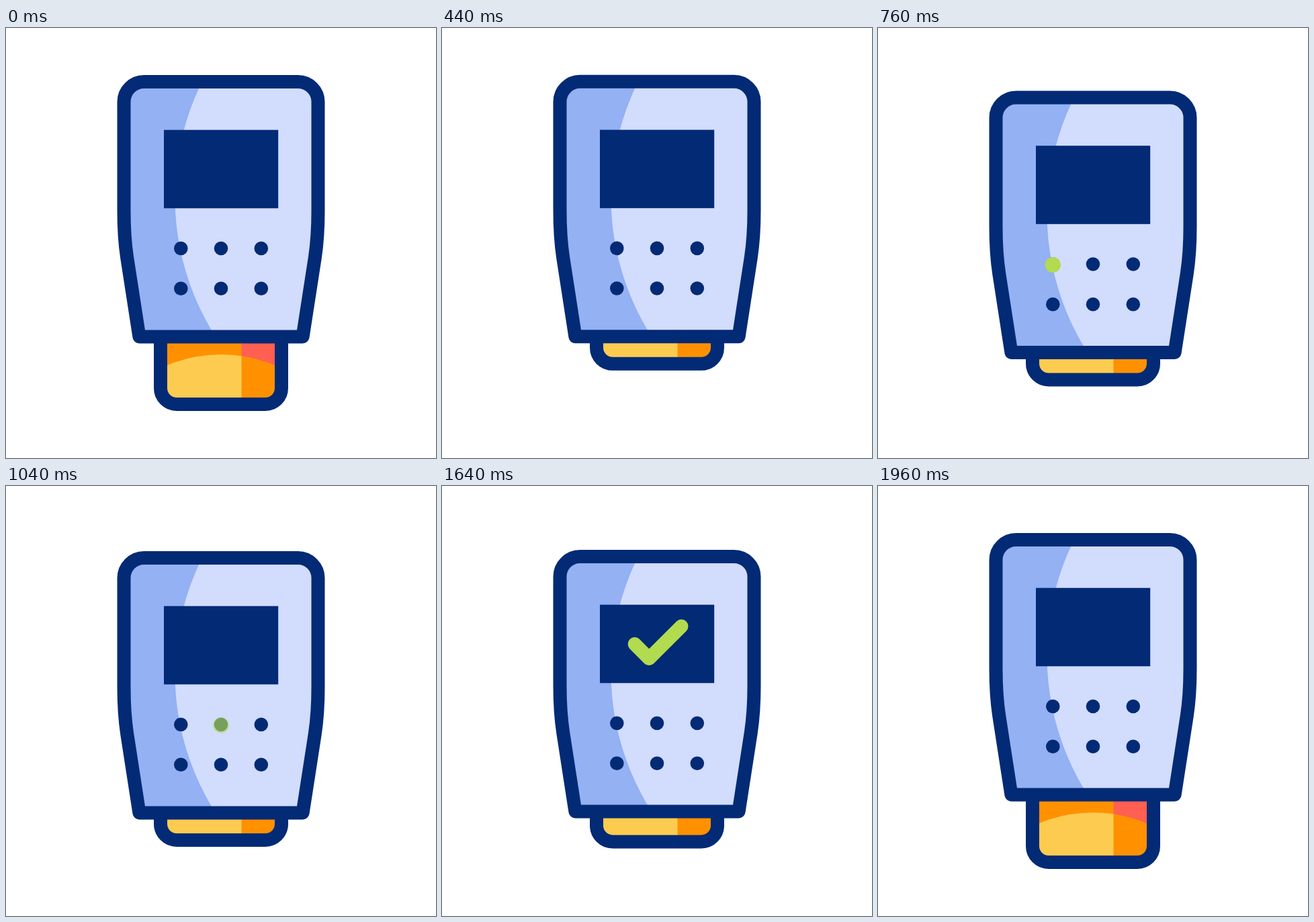
An HTML page for the animation above (2000 ms loop, 640 px wide and 640 px high).

```html
<!DOCTYPE html>
<html lang="en">
<head>
<meta charset="utf-8">
<title>Card reader</title>
<style>
  html, body { margin: 0; width: 100%; height: 100%; overflow: hidden; background: #fff; }
  svg { display: block; width: 100vw; height: 100vh; }
  .line { fill: none; stroke: #032a75; stroke-width: 20; stroke-linejoin: round; }
  .navy { fill: #032a75; }
  .lit { fill: #b2db50; }
</style>
</head>
<body>
<svg viewBox="0 0 640 640">
  <defs>
    <path id="case" d="M198.4 459.5L180.2 342Q175.5 311 175.5 272V110A30 30 0 0 1 205.5 80H434.5A30 30 0 0 1 464.5 110V272Q464.5 311 459.8 342L441.6 459.5Z"/>
    <path id="slip" d="M230 430V536A24 24 0 0 0 254 560H386A24 24 0 0 0 410 536V430Z"/>
    <clipPath id="caseClip"><use href="#case"/></clipPath>
    <clipPath id="slipClip"><use href="#slip"/></clipPath>
    <clipPath id="shadeClip"><path d="M220 420H420V514.5L400 502A208 208 0 0 0 240 502L220 514.5Z"/></clipPath>
  </defs>

  <g id="card">
    <g clip-path="url(#slipClip)">
      <rect x="220" y="420" width="200" height="150" fill="#fdcb50"/>
      <rect x="350.5" y="420" width="70" height="150" fill="#ff9100"/>
      <g clip-path="url(#shadeClip)">
        <rect x="220" y="420" width="200" height="150" fill="#ff9100"/>
        <rect x="350.5" y="420" width="70" height="150" fill="#ff6052"/>
      </g>
    </g>
    <use href="#slip" class="line"/>
  </g>

  <g id="reader">
    <g clip-path="url(#caseClip)">
      <rect x="160" y="70" width="320" height="400" fill="#93b1f3"/>
      <circle cx="638" cy="252" r="386.5" fill="#d2dcfd"/>
    </g>
    <use href="#case" class="line"/>
    <rect class="navy" x="235" y="151.7" width="170.2" height="116.6"/>
    <g id="keys"></g>
    <path id="check" d="M286.8 210.3L308.2 231.7L356.3 183.7" pathLength="1" fill="none"
      stroke="#b2db50" stroke-width="20.4" stroke-linecap="round" stroke-linejoin="round"/>
  </g>
</svg>
<script>
const LOOP = 2000, STEP = 40;
const $ = id => document.getElementById(id);
const smooth = p => p * p * (3 - 2 * p);
const linear = p => p;

// Each track is a list of [time, value] keys.
const readerY = [[80, 0], [320, 19.7], [560, -20], [800, 27], [1600, 27], [1840, 0]];
const cardSlide = [[80, 0], [320, -60], [1600, -60], [1840, 0]];
const checkDraw = [[1280, 0], [1480, 1], [1760, 1], [1960, 0]];
const flash = [[0, 0], [120, 1], [240, 0]];

function at(track, t, ease = smooth) {
  if (t <= track[0][0]) return track[0][1];
  for (let i = 1; i < track.length; i++) {
    const [t0, a] = track[i - 1], [t1, b] = track[i];
    if (t < t1) return a + (b - a) * ease((t - t0) / (t1 - t0));
  }
  return track[track.length - 1][1];
}

function dot(cx, cy, r, cls) {
  const c = document.createElementNS("http://www.w3.org/2000/svg", "circle");
  for (const [k, v] of Object.entries({ cx, cy, r, class: cls })) c.setAttribute(k, v);
  return $("keys").appendChild(c);
}

const columns = [260.3, 320, 379.8];
for (const y of [328, 387.7]) columns.forEach(x => dot(x, y, 10.3, "navy"));
const lights = columns.map(x => dot(x, 329, 11.6, "lit"));

function draw(t) {
  const y = at(readerY, t);
  $("reader").setAttribute("transform", `translate(0 ${y})`);
  $("card").setAttribute("transform", `translate(0 ${y + at(cardSlide, t)})`);
  lights.forEach((light, i) => light.setAttribute("opacity", at(flash, t - 640 - i * 240, linear)));
  const drawn = at(checkDraw, t);
  $("check").setAttribute("stroke-dasharray", `${drawn} 2`);
  $("check").setAttribute("visibility", drawn > 0 ? "visible" : "hidden");
}

function tick() {
  const t = performance.now() % LOOP;
  draw(Math.floor(t / STEP) * STEP);
  requestAnimationFrame(tick);
}
tick();
</script>
</body>
</html>
```
